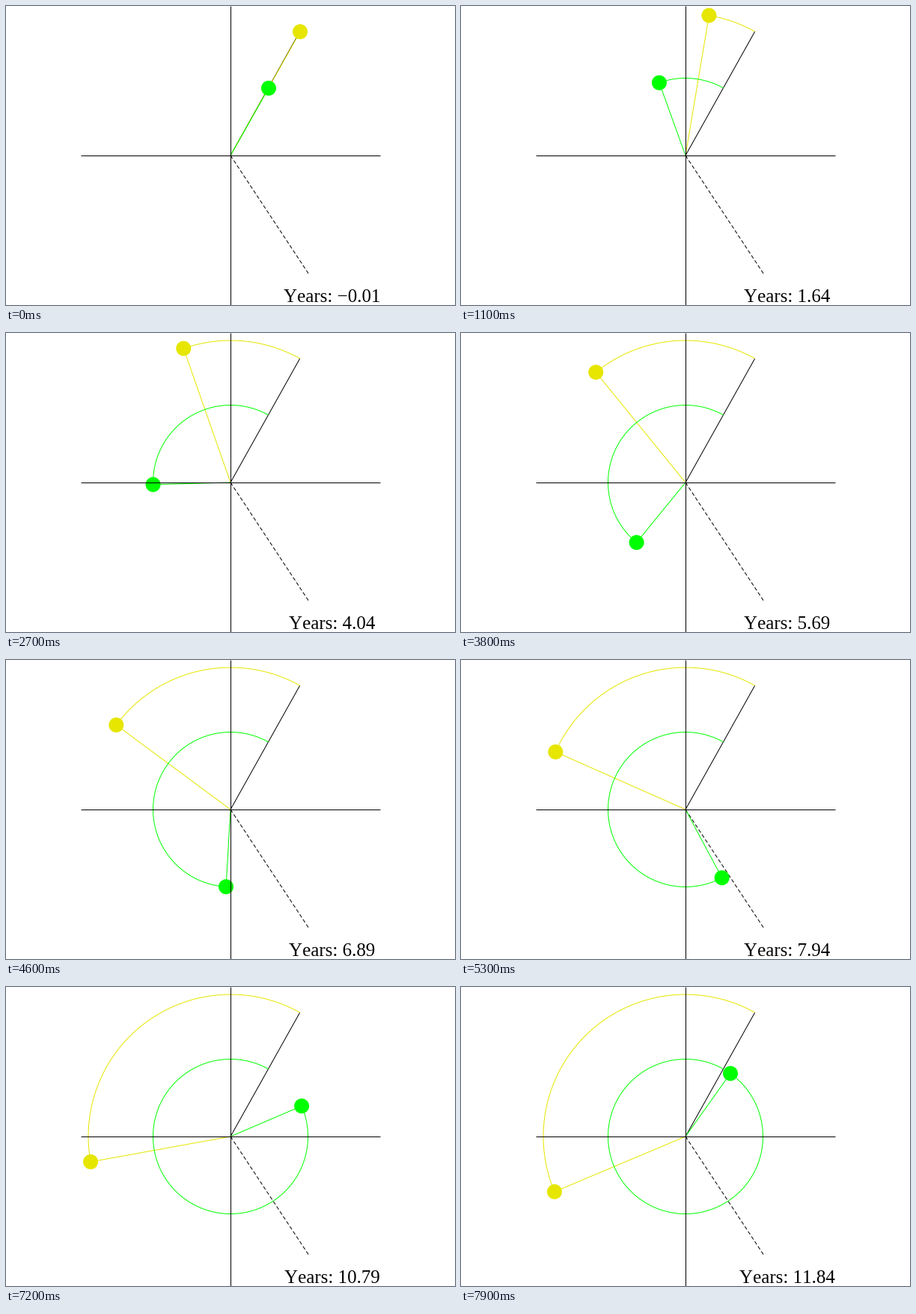
Animation, 600 px wide and 400 px high, one loop 8000 ms. Source, as a matplotlib script:

```python
import numpy as np
import matplotlib.pyplot as plt
from matplotlib.animation import FuncAnimation
from matplotlib.patches import Circle

W, H, DPI = 600, 400, 100
PX = 72 / DPI                  # one pixel in points
FRAMES = 80
FIRST, STEP = -0.01, 0.15      # years
CX, CY = 300, 200
START = 60.8                   # shared direction at year zero, degrees
MEETING = -56.6                # direction of the dashed line

plt.rcParams["font.family"] = "Liberation Serif"
plt.rcParams["text.kerning_factor"] = 6

fig = plt.figure(figsize=(W / DPI, H / DPI), dpi=DPI, facecolor="white")
ax = fig.add_axes([0, 0, 1, 1])
ax.set_xlim(0, W)
ax.set_ylim(H, 0)
ax.axis("off")


def polar(r, deg):
    a = np.radians(deg)
    return CX + r * np.cos(a), CY - r * np.sin(a)


def line(xs, ys, color="black", z=1, **kw):
    return ax.plot(xs, ys, color=color, lw=PX, zorder=z,
                   solid_capstyle="butt", **kw)[0]


def ray(r, deg, **kw):
    x, y = polar(r, deg)
    return line([CX, x], [CY, y], **kw)


class Planet:
    def __init__(self, r, rate, color, z):
        self.r, self.rate = r, rate
        self.ray = line([], [], color, z)
        self.arc = line([], [], color, z)
        self.disc = ax.add_patch(Circle((CX, CY), 10, fc=color, lw=0, zorder=z + 1))

    def move(self, years):
        end = START + self.rate * years
        x, y = polar(self.r, end)
        self.ray.set_data([CX, x], [CY, y])
        self.arc.set_data(*polar(self.r, np.linspace(START, end, 240)))
        self.disc.center = x, y


ray(190, START)
ray(189, MEETING, linestyle=(0, (5, 3)))
planets = [Planet(190, 12, "#e6e600", 2), Planet(103.5, 29.88, "#00ff00", 4)]
line([100, 500], [CY, CY], z=8)
line([CX, CX], [0, H], z=8)
label = ax.text(435.8, 396.5, "", fontsize=25 * PX, ha="center", va="baseline")


def update(i):
    years = FIRST + i * STEP
    for p in planets:
        p.move(years)
    label.set_text(f"Years: {years:.2f}".replace("-", "\u2212"))
    return []


anim = FuncAnimation(fig, update, frames=FRAMES, interval=100,
                     repeat=True, repeat_delay=0, blit=False)
plt.show()
```
